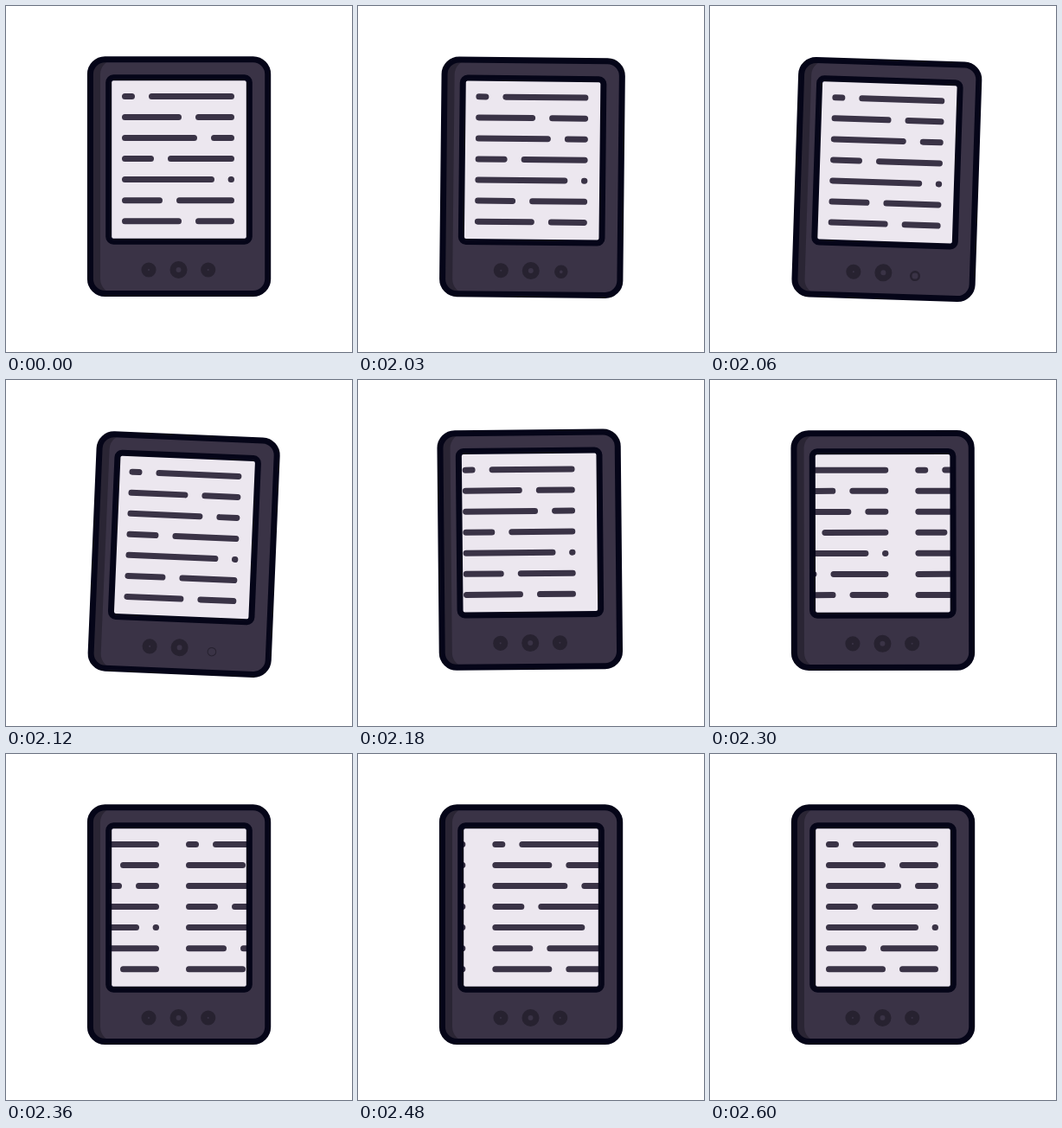
These frames come from a looping animation (400x400 px, 2.69 s). An HTML page:

```html
<!DOCTYPE html>
<html lang="en">
<head>
<meta charset="utf-8">
<style>
  html, body { margin: 0; width: 100%; height: 100%; overflow: hidden; background: #fff; }
  svg { display: block; width: 100vw; height: 100vh; }
  .edge { fill: none; stroke: #050518; stroke-width: 7; }
  .body { fill: #3a3346; }
  .shade { fill: #2a2534; }
  .screen { fill: #ece7ef; }
  .text { fill: none; stroke: #3a3346; stroke-width: 7; stroke-linecap: round; }
  .button { fill: none; stroke: #272230; }
</style>
</head>
<body>
<svg viewBox="0 0 400 400">
  <defs>
    <clipPath id="case"><rect x="96" y="60.5" width="208" height="273" rx="18"/></clipPath>
    <clipPath id="glass"><rect x="121" y="85" width="158" height="185" rx="3"/></clipPath>
  </defs>
  <g id="reader">
    <g clip-path="url(#case)">
      <rect class="shade" x="96" y="60" width="208" height="274"/>
      <rect class="body" x="109" y="62" width="210" height="270.5" rx="17"/>
    </g>
    <rect class="edge" x="97.4" y="61.8" width="205.3" height="270.7" rx="17"/>
    <rect class="screen" x="118.7" y="82.8" width="162.6" height="189.4" rx="5.5"/>
    <g clip-path="url(#glass)">
      <g id="pages"><path class="text"/><path class="text"/></g>
    </g>
    <rect class="edge" x="118.7" y="82.8" width="162.6" height="189.4" rx="5.5"/>
    <circle class="button" cx="165" cy="305" r="4.8" stroke-width="7.5"/>
    <circle class="button" cx="199.5" cy="305" r="6.5" stroke-width="7"/>
    <circle class="button" id="next" cx="233.7" cy="305" r="4.8"/>
  </g>
</svg>
<script>
  const LOOP = 2690, START = 2030, STEP = 30;
  const PAGE = 161, LEFT = 134, RIGHT = 264, CAP = 3.5;

  // Each row: end of the first dash, start of the second
  const rows = [[149, 165], [203, 219], [221, 237], [171, 187], [241, 256.6], [181, 197], [203, 219]];
  // Tilt in degrees, one value per step from START
  const tilts = [0.6, 1.85, 2.75, 2.4, 0.95, -0.55, -0.9, -0.62, -0.3, -0.1, 0];

  const reader = document.getElementById('reader');
  const pages = document.getElementById('pages');
  const next = document.getElementById('next');

  const dash = (a, b, y) => `M${a + CAP} ${y}H${Math.max(b - CAP, a + CAP + 0.1)}`;
  const lines = rows.map(([end, start], i) => {
    const y = 104.4 + 24.05 * i;
    return dash(LEFT, end, y) + dash(start, RIGHT, y);
  }).join('');
  [...pages.children].forEach((page, i) => {
    page.setAttribute('d', lines);
    page.setAttribute('transform', `translate(${i * PAGE} 0)`);
  });

  const clamp = (v, lo, hi) => Math.min(hi, Math.max(lo, v));

  function slide(t) {
    const p = clamp((t - 2094) / 506, 0, 1);
    return PAGE * (1 - Math.cos(Math.PI * p)) / 2;
  }

  function draw(t) {
    const step = Math.floor((t - START) / STEP);
    const tilt = tilts[step] || 0;
    const press = Math.max(0, tilt) / 2.4;
    const time = step < 0 ? 0 : START + step * STEP;

    reader.setAttribute('transform', `rotate(${tilt} 97 333)`);
    pages.setAttribute('transform', `translate(${-slide(time)} 0)`);
    next.setAttribute('transform', `translate(${3.3 * press} ${3.3 * press})`);
    next.setAttribute('stroke-width', Math.max(0.6, 7.5 - 6.5 * press));
  }

  const origin = performance.now();
  function tick() {
    draw((performance.now() - origin) % LOOP);
    requestAnimationFrame(tick);
  }
  tick();
</script>
</body>
</html>
```
